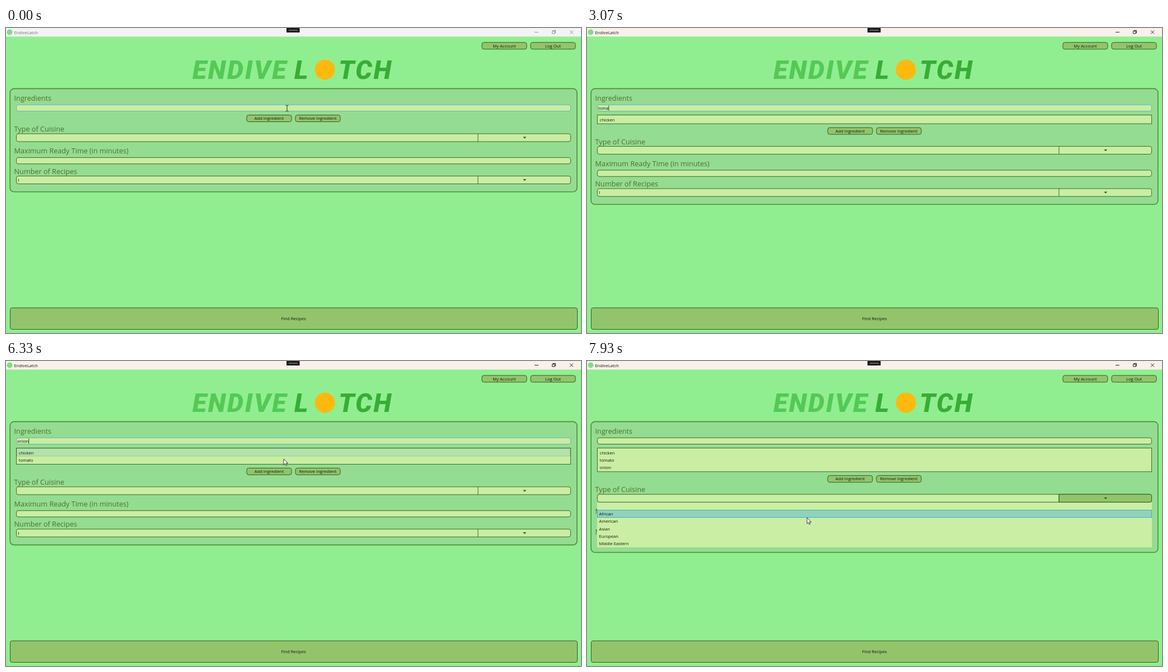
An HTML page that plays this animation: 1027x545 px, repeating every 8000 ms.

```html
<!DOCTYPE html>
<html lang="en">
<head>
<meta charset="utf-8">
<title>EndiveLatch</title>
<style>
  html, body { margin: 0; width: 100%; height: 100%; overflow: hidden; background: #90ee90; }
  svg { display: block; width: 1027px; height: 545px; }
  text { font: 7.6px "Open Sans", "Noto Sans", sans-serif; fill: #10180c; }
  .label { font-size: 12.65px; fill: #4f6f2b; }
  .mid { text-anchor: middle; }
  .word { font: italic 900 46.4px Roboto, sans-serif; letter-spacing: 2.6px; }
  .button { fill: #93c46c; stroke: #2f5c1c; }
  .field { fill: #c9eda3; stroke: #3b6b22; }
  .focus { stroke: #62b3c4; }
  .divider { stroke: #3b6b22; }
  .hover { fill: #b3e2ac; stroke: #8fb98a; stroke-width: .7; }
  .chrome { fill: none; stroke: #111; stroke-width: .9; }
  .idle .chrome { stroke: #858585; }
  .idle text { fill: #6f6f6f; }
</style>
</head>
<body>
<svg id="stage" viewBox="0 0 1027 545" xmlns="http://www.w3.org/2000/svg"></svg>
<script>
const stage = document.getElementById('stage');

function add(parent, tag, attrs = {}, text = '') {
  const el = document.createElementNS('http://www.w3.org/2000/svg', tag);
  for (const key in attrs) el.setAttribute(key, attrs[key]);
  el.textContent = text;
  parent.append(el);
  return el;
}
const group = parent => add(parent, 'g');
const box = (parent, cls, x, y, width, height, rx = 0) =>
  add(parent, 'rect', { class: cls, x, y, width, height, rx });
const write = (parent, x, y, text, cls = '') => add(parent, 'text', { x, y, class: cls }, text);
const show = (el, on) => el.setAttribute('visibility', on ? 'visible' : 'hidden');

function button(parent, x, y, text) {
  box(parent, 'button', x + .5, y, 80, 12, 3.5);
  write(parent, x + 40.5, y + 8.8, text, 'mid');
}

function combo(parent, y) {
  box(parent, 'field', 18.5, y, 990, 14, 3.5);
  const arrowArea = add(parent, 'path', {
    class: 'button', d: `M843 ${y}h162q3.5 0 3.5 3.5v7q0 3.5 -3.5 3.5h-162z`
  });
  add(parent, 'path', { class: 'divider', d: `M843 ${y}v14` });
  add(parent, 'path', { fill: '#0b6b14', d: `M923.4 ${y + 5.6}h5.8l-2.9 3.2z` });
  return arrowArea;
}

// Title bar
const bar = group(stage);
const barFill = box(bar, '', 0, 0, 1027, 15.3);
add(bar, 'circle', { cx: 6.5, cy: 7.5, r: 5, fill: '#7ddf80' });
write(bar, 14.4, 10.6, 'EndiveLatch');
add(bar, 'path', {
  class: 'chrome',
  d: 'M944 7.5h7M975.5 5.5h4.5v4.5h-4.5zM977 5.5v-1.2h4.5v4.6h-1.4M1007 4.5l6 6M1013 4.5l-6 6'
});
add(stage, 'rect', { x: 501, y: 0, width: 23.5, height: 8, fill: '#181a18' });
add(stage, 'rect', { x: 505, y: 3, width: 16, height: 2.2, fill: '#5f625f' });

// Header
button(stage, 849.5, 25.8, 'My Account');
button(stage, 936.5, 25.8, 'Log Out');
add(write(stage, 333, 91, '', 'word'), 'tspan', { fill: '#54c956' }, 'ENDIVE');
add(write(stage, 515, 91, '', 'word'), 'tspan', { fill: '#38ad36' }, 'L');
add(stage, 'circle', { cx: 569.5, cy: 74.5, r: 18, fill: '#ffb90e' });
add(write(stage, 594, 91, '', 'word'), 'tspan', { fill: '#38ad36' }, 'TCH');

// Form panel
const panel = add(stage, 'rect', {
  x: 7.2, y: 108.4, width: 1012.6, rx: 7, fill: '#94dc92', stroke: '#4b912f', 'stroke-width': 1.6
});
write(stage, 14.6, 129.8, 'Ingredients', 'label');
const entry = box(stage, 'field', 18.5, 137.2, 990, 11.3, 3.5);
const typed = write(stage, 20, 145.8, '');
const caret = add(stage, 'path', { stroke: '#1c2a14', 'stroke-width': .8 });

// Ingredient list
const list = group(stage);
const listBox = box(list, 'field', 18.5, 155.5, 990, 15.6);
const PITCH = 13.35;
const rows = ['chicken', 'tomato', 'onion'].map((name, i) => {
  const row = group(list);
  const mark = box(row, 'hover', 19.6, 156.6 + i * PITCH, 987.8, 13.3);
  write(row, 22.8, 166.6 + i * PITCH, name);
  return { row, mark };
});

// Everything below the list slides as it grows
const lower = group(stage);
button(lower, 429.5, 155.5, 'Add Ingredient');
button(lower, 516.5, 155.5, 'Remove Ingredient');
write(lower, 14.6, 185.3, 'Type of Cuisine', 'label');
const cuisineArrow = combo(lower, 189);
write(lower, 14.6, 224.3, 'Maximum Ready Time (in minutes)', 'label');
box(lower, 'field', 18.5, 231.5, 990, 11.3, 3.5);
write(lower, 14.6, 260.6, 'Number of Recipes', 'label');
show(combo(lower, 264.5), false);
write(lower, 20, 274.7, '1');

// Cuisine menu
const menu = group(stage);
const MENU_TOP = 253;
box(menu, '', 18, MENU_TOP, 991, 80).setAttribute('fill', '#caeea4');
const menuMark = add(menu, 'rect', {
  x: 18.5, width: 990, height: 13, fill: '#8fd3ba', stroke: '#45a0cc', 'stroke-width': .9
});
['', 'African', 'American', 'Asian', 'European', 'Middle Eastern'].forEach((name, i) =>
  write(menu, 21.6, 262.7 + i * 13.3, name));

box(stage, 'button', 7.5, 500, 1013, 38.5, 3.5);
write(stage, 513.5, 522, 'Find Recipes', 'mid');

// Pointers
const arrow = add(stage, 'path', {
  d: 'M0 0V10.6L2.4 8.4L4.1 12L5.8 11.2L4.2 7.7H7.5Z',
  fill: '#fff', stroke: '#111', 'stroke-width': .8, 'stroke-linejoin': 'round'
});
const beam = add(stage, 'path', {
  d: 'M-2.6 -5.4Q0 -5.4 0 -4.4Q0 -5.4 2.6 -5.4M0 -4.6V4.6M-2.6 5.4Q0 5.4 0 4.4Q0 5.4 2.6 5.4',
  fill: 'none', stroke: '#25301f', 'stroke-width': 1
});

// Timeline
const LOOP = 8000;
const typing = [
  [0, ''], [200, 'c'], [530, 'ch'], [670, 'chi'], [730, 'chic'], [870, 'chick'], [930, 'chicke'],
  [1070, 'chicken'], [1800, ''], [2530, 't'], [2800, 'to'], [2930, 'tom'], [3070, 'toma'],
  [3200, 'tomato'], [4200, ''], [5330, 'o'], [5470, 'on'], [5600, 'oni'], [5670, 'onio'],
  [5800, 'onion'], [6870, '']
];
const added = [1800, 4200, 6870];
const focused = [[0, 1800], [2270, 4070], [4670, 6730]];
const caretOn = [[200, 1470], [2330, 4070], [4730, 6730]];
const pointerOff = [[200, 1400], [2530, 3730], [5330, 6200]];
const path = [
  [0, 502, 143.5], [1330, 502, 143.5], [1600, 491, 165], [1800, 491, 164], [1870, 488, 160],
  [2200, 485, 143], [3670, 485, 143], [3930, 481, 181], [4200, 481, 181], [4670, 516, 140],
  [6130, 516, 140], [6330, 496, 175], [6530, 484, 201], [6800, 484, 201], [7330, 438, 242],
  [7530, 438, 242], [7930, 393, 280], [8000, 393, 280]
];

const within = (spans, t) => spans.some(([from, to]) => t >= from && t < to);

function pointer(t) {
  const i = Math.max(1, path.findIndex(p => p[0] >= t));
  const [t0, x0, y0] = path[i - 1], [t1, x1, y1] = path[i];
  const k = Math.max(0, (t - t0) / (t1 - t0));
  return { x: x0 + (x1 - x0) * k, y: y0 + (y1 - y0) * k };
}

function render(t) {
  const idle = t < 70;
  bar.setAttribute('class', idle ? 'idle' : '');
  barFill.setAttribute('fill', idle ? '#f3f3f3' : '#faf0ea');

  const word = typing.filter(e => e[0] <= t).pop()[1];
  typed.textContent = word;
  entry.setAttribute('class', within(focused, t) ? 'field focus' : 'field');
  const caretX = 20.3 + (word ? typed.getComputedTextLength() : 0);
  caret.setAttribute('d', `M${caretX} 138.3V147.6`);
  show(caret, within(caretOn, t));

  const count = added.filter(a => a <= t).length;
  const shift = count ? 9.15 + PITCH * count : 0;
  panel.setAttribute('height', 184.4 + shift);
  lower.setAttribute('transform', `translate(0 ${shift})`);
  list.setAttribute('display', count ? 'inline' : 'none');
  listBox.setAttribute('height', 15.6 + PITCH * Math.max(0, count - 1));

  // Hover marks trail the pointer by one step
  const at = pointer(t), before = pointer(Math.max(0, t - 67));
  const visible = !within(pointerOff, t);
  const overRow = visible ? Math.floor((before.y - 156.5) / PITCH) : -1;
  rows.forEach(({ row, mark }, i) => {
    row.setAttribute('display', i < count ? 'inline' : 'none');
    show(mark, i === overRow);
  });
  show(cuisineArrow, count === 3 && at.y >= 189 + shift);

  const open = t >= 7600;
  const item = Math.floor((before.y - MENU_TOP) / 13.3);
  menu.setAttribute('display', open ? 'inline' : 'none');
  menuMark.setAttribute('y', MENU_TOP + .2 + Math.max(0, item) * 13.3);
  show(menuMark, open && item >= 0);

  const overEntry = at.y < 149.5;
  show(beam, visible && overEntry);
  show(arrow, visible && !overEntry);
  (overEntry ? beam : arrow).setAttribute('transform', `translate(${at.x} ${at.y})`);
}

const start = performance.now();
function tick() {
  const t = (performance.now() - start) % LOOP;
  const step = Math.floor((t + 4) * 15 / 1000) % 120;
  render(Math.round(step * 20 / 3) * 10);
  requestAnimationFrame(tick);
}
tick();
</script>
</body>
</html>
```
